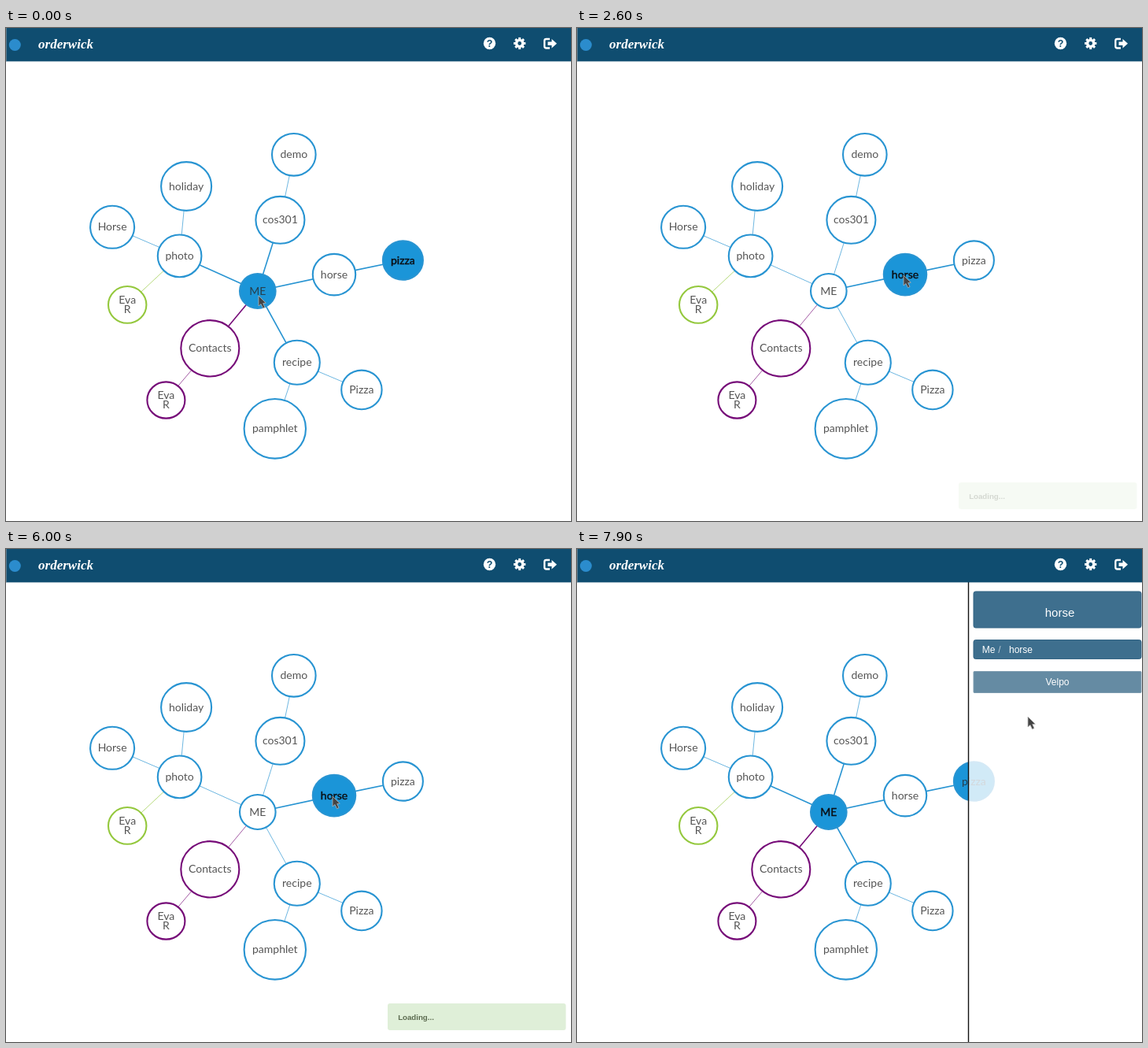
These frames come from a looping animation (718 px wide and 626 px high, 8000 ms). An HTML page:

```html
<!DOCTYPE html>
<html lang="en">
<head>
<meta charset="utf-8">
<title>Mind map</title>
<style>
  html, body { margin: 0; width: 100%; height: 100%; overflow: hidden; background: #fff; }
  svg { display: block; width: 718px; height: 626px; }
  text { text-anchor: middle; font-family: "Liberation Sans", Arial, sans-serif; }
  .edge { stroke-width: .9; opacity: .75; }
  .edge.hot { stroke-width: 1.6; opacity: 1; }
  .node ellipse { fill: #fff; stroke-width: 2.1; }
  .node text { font: 14px Lato, sans-serif; fill: #555; }
  .node.hover ellipse, .node.selected ellipse { fill: #1b95d8; }
  .node.hover text { fill: #263f4e; }
  .node.selected text { fill: #0b0f14; stroke: #0b0f14; stroke-width: .4; }
  .panel text { fill: #fff; font-size: 12px; }
</style>
</head>
<body>
<svg viewBox="0 0 718 626">
  <g id="edges"></g>
  <g id="nodes"></g>

  <g id="panel" class="panel">
    <path d="M498 42H718V626H498Z" fill="#fff" opacity=".8"/>
    <path d="M497.5 42V626" stroke="#111" stroke-width="1.4"/>
    <g fill="#3e6f8e" stroke="#336484">
      <rect x="504" y="54" width="213" height="46" rx="2.5"/>
      <rect x="504" y="115.5" width="213" height="24" rx="2.5"/>
      <rect x="504" y="155.5" width="213" height="27" rx="1" fill="#658ba3" stroke="#7d9cb0"/>
    </g>
    <text x="613.5" y="86" style="font-size:15px">horse</text>
    <text x="523" y="131.5">Me</text>
    <text x="537" y="131.5" style="fill:#b9c9d4">/</text>
    <text x="564" y="131.5">horse</text>
    <text x="610.5" y="173">Velpo</text>
  </g>

  <g id="notice">
    <rect x="485" y="577" width="226.5" height="34" rx="3" fill="#dfefd8"/>
    <text x="521" y="597.5" font-size="9.7" font-weight="bold" fill="#5c6b50">Loading...</text>
  </g>

  <g id="header">
    <rect width="718" height="42.4" fill="#0f4d70"/>
    <path d="M.5 0V42" stroke="#58798c"/>
    <circle cx="11.3" cy="21.5" r="7.5" fill="#2b8ccd"/>
    <text x="76" y="25.5" fill="#fff" style="font:italic bold 17px 'Liberation Serif',serif">orderwick</text>
    <circle cx="614.5" cy="19.5" r="7.7" fill="#fff"/>
    <text x="614.5" y="24" font-size="12.5" font-weight="bold" fill="#0f4d70">?</text>
    <g transform="translate(652.7 19.5)" fill="none" stroke="#fff">
      <circle r="4.1" stroke-width="3.4"/>
      <g id="teeth" stroke-width="3"></g>
    </g>
    <path d="M691 14H686.5Q684.3 14 684.3 16.2V23.3Q684.3 25.5 686.5 25.5H691" fill="none" stroke="#fff" stroke-width="2.3"/>
    <path d="M688.5 17.5H693.5V14L700 19.7L693.5 25.4V22H688.5Z" fill="#fff"/>
  </g>

  <path id="cursor" d="M0 0V13L3 10.5L5.5 15.7L8 14.6L5.7 9.6L9.3 9.2Z" fill="#444" stroke="#b5b5b5" stroke-width=".8"/>
</svg>

<script>
const LOOP = 8000, STEP = 100;
const BLUE = "#2894d2", PURPLE = "#760b78", GREEN = "#94c83d";
const CLICK = 1900, LOADED = 6400, LEFT_MAP = 7550;
const FLATTEN = .965;
const $ = id => document.getElementById(id);

// id, label, x, y, horizontal radius, parent, colour
const nodes = [
  ["me", "ME", 319.8, 334, 22.8, null, BLUE],
  ["cos", "cos301", 348.4, 243.8, 31, "me", BLUE],
  ["demo", "demo", 365.8, 160.8, 27.8, "cos", BLUE],
  ["photo", "photo", 220.6, 289.4, 27.8, "me", BLUE],
  ["holiday", "holiday", 229.1, 201, 32, "photo", BLUE],
  ["ride", "Horse", 135.1, 252.8, 28, "photo", BLUE],
  ["friend", "Eva R", 154.2, 351.4, 24.2, "photo", GREEN],
  ["contacts", "Contacts", 259.3, 406.8, 37, "me", PURPLE],
  ["contact", "Eva R", 203.4, 472.5, 24, "contacts", PURPLE],
  ["recipe", "recipe", 369.8, 424.8, 29, "me", BLUE],
  ["dish", "Pizza", 451.9, 459.4, 25.7, "recipe", BLUE],
  ["pamphlet", "pamphlet", 341.8, 508.8, 39.2, "recipe", BLUE],
  ["horse", "horse", 417, 313.1, 27.2, "me", BLUE],
  ["pizza", "pizza", 504.4, 295, 25.5, "horse", BLUE],
].map(([id, label, x, y, r, parent, color]) => ({ id, label, x, y, r, parent, color }));
const byId = Object.fromEntries(nodes.map(n => [n.id, n]));

function labelMarkup({ label, x, y }) {
  const lines = label.split(" ");
  return lines.map((line, i) =>
    `<text x="${x}" y="${y + 4.6 + (i - (lines.length - 1) / 2) * 12.5}">${line}</text>`).join("");
}

$("edges").innerHTML = nodes.filter(n => n.parent).map(n => {
  const p = byId[n.parent];
  return `<line class="edge" id="edge-${n.id}" x1="${p.x}" y1="${p.y}" x2="${n.x}" y2="${n.y}" stroke="${n.color}"/>`;
}).join("");
$("nodes").innerHTML = nodes.map(n =>
  `<g class="node" id="node-${n.id}"><ellipse cx="${n.x}" cy="${n.y}" rx="${n.r}" ry="${n.r * FLATTEN}" stroke="${n.color}"/>${labelMarkup(n)}</g>`
).join("");
$("teeth").innerHTML = Array.from({ length: 8 }, (_, i) =>
  `<path d="M0 -5V-7.6" transform="rotate(${i * 45})"/>`).join("");

// time, x, y of the pointer tip
const pointerPath = [
  [200, 321, 340], [1000, 415, 314], [7250, 415, 314], [7550, 490, 288], [7850, 573, 213],
];
const ramp = (t, from, to) => Math.min(1, Math.max(0, (t - from) / (to - from)));
const smooth = k => k * k * (3 - 2 * k);

function pointerAt(t) {
  let [, x, y] = pointerPath[0];
  for (let i = 1; i < pointerPath.length; i++) {
    const [t0, x0, y0] = pointerPath[i - 1], [t1, x1, y1] = pointerPath[i];
    const k = smooth(ramp(t, t0, t1));
    x += (x1 - x0) * k;
    y += (y1 - y0) * k;
  }
  return [x, y];
}

// Over the side panel the map keeps its last hovered node.
function hoveredAt(t) {
  const [x, y] = pointerAt(Math.min(t, LEFT_MAP));
  return nodes.find(n => Math.hypot(x - n.x, y - n.y) < n.r)?.id;
}

function render(t) {
  const hovered = hoveredAt(t);
  const selected = t < CLICK ? "pizza" : t < LOADED ? "horse" : "me";
  const active = id => id === hovered || id === selected;
  for (const n of nodes) {
    const { classList } = $("node-" + n.id);
    classList.toggle("hover", n.id === hovered);
    classList.toggle("selected", n.id === selected);
    if (n.parent) $("edge-" + n.id).classList.toggle("hot", active(n.id) || active(n.parent));
  }
  $("panel").style.display = t < LOADED ? "none" : "";
  $("notice").style.opacity = smooth(ramp(t, 2400, 3000)) * (1 - ramp(t, LOADED, 7150));
  $("cursor").setAttribute("transform", `translate(${pointerAt(t)})`);
}

function frame() {
  const t = performance.now() % LOOP;
  render(Math.floor(t / STEP) * STEP);
  requestAnimationFrame(frame);
}
frame();
</script>
</body>
</html>
```
